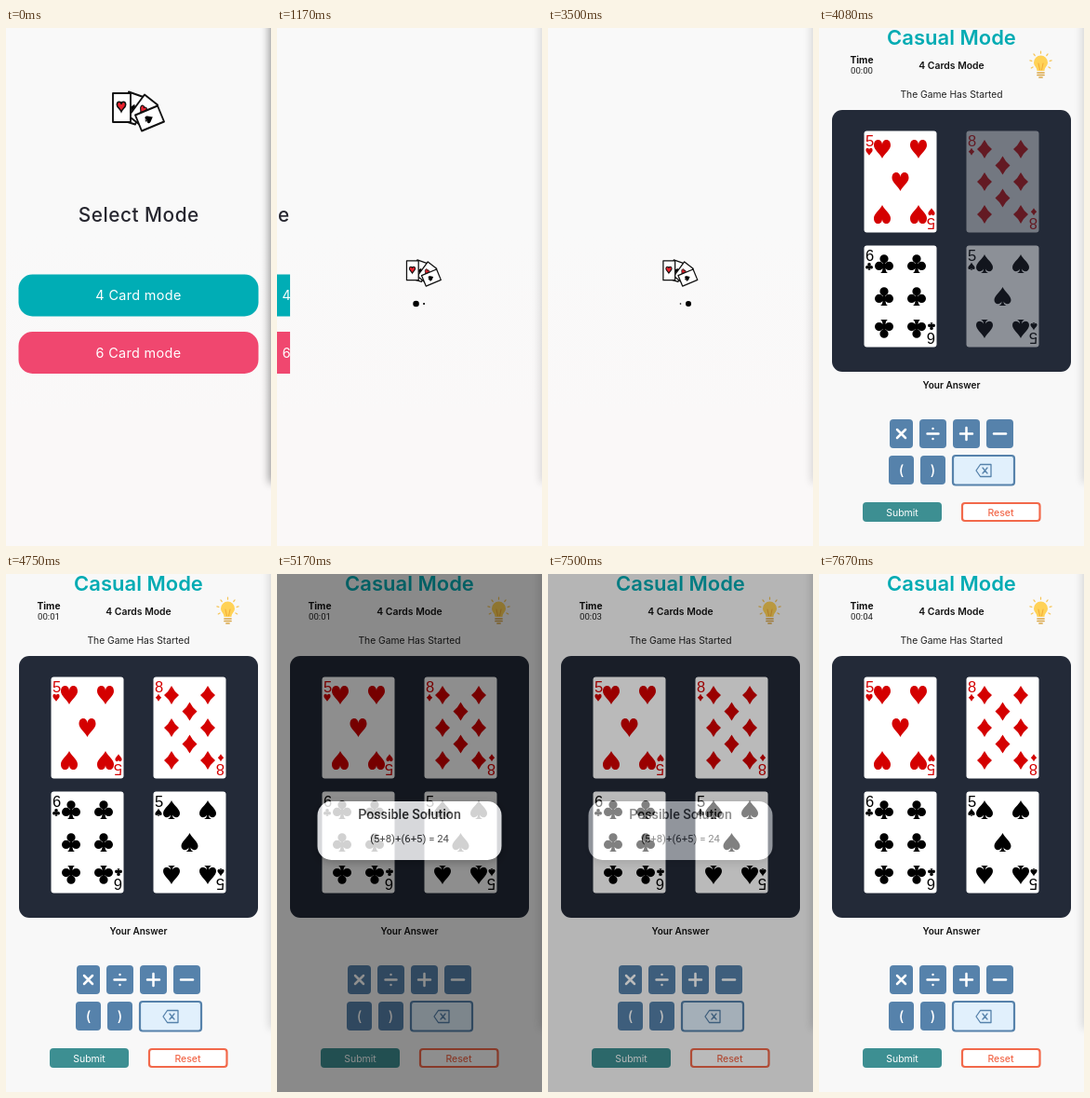
Recreate the animation shown at these times as an HTML page. Size 285 by 556 pixels, loop 8 s.

```html
<!DOCTYPE html>
<html lang="en">
<head>
<meta charset="utf-8">
<title>Card game</title>
<style>
  html, body { margin: 0; width: 100%; height: 100%; overflow: hidden; background: #f9f8f8; }
  svg { display: block; width: 285px; height: 556px; }
  text { font-family: Inter, "Open Sans", sans-serif; text-anchor: middle; }
  .roboto { font-family: Roboto, "Liberation Sans", sans-serif; }
  .rank { font-family: "Liberation Sans", Arial, sans-serif; }
  .wide { letter-spacing: .025em; }
</style>
</head>
<body>
<svg id="stage" viewBox="0 0 285 556"></svg>
<script>
const BLUE = '#5682ab', TEAL = '#00abb3', RED = '#d40000';

const PIPS = {
  heart: 'M0 10C-2 5-9 1-9-4C-9-8-7-10-4.5-10C-2-10 0-8 0-5C0-8 2-10 4.5-10C7-10 9-8 9-4C9 1 2 5 0 10Z',
  diamond: 'M0-10Q3-4 8 0Q3 4 0 10Q-3 4-8 0Q-3-4 0-10Z',
  spade: 'M0-10C2-5 9-1 9 4C9 9 3 9.5 1 5.5Q1 9 4 10H-4Q-1 9-1 5.5C-3 9.5-9 9-9 4C-9-1-2-5 0-10Z',
  club: [[0, -5.2], [-5.4, 2.4], [5.4, 2.4]].map(([x, y]) =>
    `M${x - 4.6} ${y}a4.6 4.6 0 1 1 9.2 0a4.6 4.6 0 1 1-9.2 0Z`).join('') +
    'M-1.5-2H1.5V4Q1.5 9 4 10H-4Q-1.5 9-1.5 4Z'
};

const rect = (x, y, w, h, r, fill, more = '') =>
  `<rect x="${x}" y="${y}" width="${w}" height="${h}" rx="${r}" fill="${fill}" ${more}/>`;
const text = (s, x, y, size, weight, fill, more = '') =>
  `<text x="${x}" y="${y}" font-size="${size}" font-weight="${weight}" fill="${fill}" ${more}>${s}</text>`;
const line = (d, stroke, width, fill = 'none') =>
  `<path d="${d}" fill="${fill}" stroke="${stroke}" stroke-width="${width}" stroke-linejoin="round" stroke-linecap="round"/>`;
const pip = (suit, x, y, scale = 1, turn = 0, more = '') =>
  `<path d="${PIPS[suit]}" transform="translate(${x} ${y}) rotate(${turn}) scale(${scale})" ${more}/>`;

// Fan of four cards, centred on the origin
function fan(x, y, scale) {
  const sheet = d => line(d, '#111', 1.9, '#fff');
  const inked = 'fill="#e8222e" stroke="#111" stroke-width="3"';
  return `<g transform="translate(${x} ${y}) scale(${scale})">` +
    sheet('M-10-21L7-15L-3 14L-19 9Z') + pip('spade', -5, -4, .4, 18) +
    sheet('M7-18L21-7L4 16L-10 5Z') + pip('heart', 5, -2, .38, 35, inked) +
    sheet('M21-6L28 11L4 21L-3 4Z') + pip('spade', 12, 8, .45, 62) +
    sheet('M-27-19.5H-8V11.5H-27Z') + pip('heart', -18, -5, .52, 0, inked) + '</g>';
}

// The corners and half of the pips repeat under a half turn
function card(id, x, y, rank, suit, half, fixed) {
  const color = suit == 'heart' || suit == 'diamond' ? RED : '#000';
  const side = text(rank, 6, 16, 16.5, 400, color, 'class="rank"') +
    pip(suit, 5.5, 22.3, .4) + half.map(p => pip(suit, ...p)).join('');
  return `<g id="${id}" transform="translate(${x} ${y})" fill="${color}">` +
    rect(0, 0, 78, 109, 3, '#fff') + side +
    `<g transform="rotate(180 39 54.5)">${side}</g>` +
    fixed.map(p => pip(suit, ...p)).join('') + '</g>';
}

function bulb(x, y) {
  let rays = '';
  for (let i = 0; i < 7; i++) {
    const a = (150 + i * 40) * Math.PI / 180, c = Math.cos(a), s = Math.sin(a);
    rays += `M${c * 9.8} ${s * 9.8}L${c * 11.8} ${s * 11.8}`;
  }
  return `<g transform="translate(${x} ${y})">` + line(rays, '#f6c455', 1.2) +
    '<path d="M-7.5 0A7.5 7.5 0 0 1 7.5 0C7.5 4 4 5 4 9H-4C-4 5-7.5 4-7.5 0Z" fill="#ffd257"/>' +
    line('M-2.5 1L-1 8M2.5 1L1 8', '#f3ab35', 1) +
    line('M-3.5 11H3.5M-3.5 13.5H3.5M-1.5 16H1.5', '#d9a648', 1.7) + '</g>';
}

const pair = (left, right, y) => [[left, y], [right, y]];
const top2 = pair(19.5, 58.5, 19.5), mid1 = [[39, 54.5]];

const key = (x, y, w, d) => rect(x, y, w, 31, 4, BLUE) + line(d, '#fff', 2.5);

const menu = rect(0, 0, 400, 556, 0, 'url(#paper)') + fan(142, 89.5, 1) +
  text('Select Mode', 142.8, 208, 20.8, 500, '#26262f', 'class="wide"') +
  rect(13.5, 264.5, 258, 45, 15, '#00adb5') +
  text('4 Card mode', 142.5, 292, 14.4, 400, '#fff', 'class="wide"') +
  rect(13.5, 326, 258, 45, 15, '#f0476f') +
  text('6 Card mode', 142.5, 353.7, 14.4, 400, '#fff', 'class="wide"');

const loader = rect(-1.5, 0, 290, 556, 0, 'url(#paper)') + fan(142, 263, .67) +
  [134, 142.5, 151].map(x => `<circle class="dot" cx="${x}" cy="296"/>`).join('');

const game = rect(0, 0, 285, 556, 0, '#f8f8f8') +
  text('Casual Mode', 142.5, 17.5, 22, 600, TEAL) +
  text('Time', 46, 38, 10.2, 700, '#111') +
  text('00:00', 46, 49.2, 9.6, 400, '#222', 'id="clock" class="roboto"') +
  text('4 Cards Mode', 142.5, 44, 10.4, 600, '#111') +
  bulb(238.5, 37) +
  text('The Game Has Started', 142.5, 75, 10.3, 400, '#222') +
  rect(14, 88, 257, 281, 11, '#232a38') +
  card('c1', 48.5, 110.5, 5, 'heart', top2, mid1) +
  card('c2', 158.5, 110.5, 8, 'diamond', [...top2, [39, 37]], pair(19.5, 58.5, 54.5)) +
  card('c3', 48.5, 233.5, 6, 'club', pair(21.5, 56.5, 19.5), pair(21.5, 56.5, 54.5)) +
  card('c4', 158.5, 233.5, 5, 'spade', top2, mid1) +
  text('Your Answer', 142.5, 387, 10, 600, '#111') +
  key(76, 420, 25, 'M84 431l9 9m0-9l-9 9') +
  key(108, 420, 29, 'M116.5 435.5h12M122.5 430v.1M122.5 441v.1') +
  key(144, 420, 29, 'M152 435.5h13m-6.5-6.5v13') +
  key(180, 420, 29, 'M188 435.5h13') +
  rect(75, 459, 27, 31, 4, BLUE) + text('(', 88.5, 479.5, 15, 500, '#fff') +
  rect(109, 459, 27, 31, 4, BLUE) + text(')', 122.5, 479.5, 15, 500, '#fff') +
  rect(144, 459, 66, 31.5, 3, '#e1f0fc', `stroke="${BLUE}" stroke-width="2.2"`) +
  line('M169 475l4.5-6.5h11.5v13h-11.5zM176 472l5 6m0-6l-5 6', BLUE, 1.3) +
  rect(47, 509, 85, 21, 4, '#3d8f92') + text('Submit', 89.5, 523.5, 10.5, 400, '#fff') +
  rect(154, 510, 83.5, 19, 3, '#fff', 'stroke="#f2694b" stroke-width="2.2"') +
  text('Reset', 195.5, 523.5, 10.5, 500, '#f2694b');

const dialog = rect(0, 0, 285, 556, 0, '#000', 'opacity=".54"') +
  rect(43.5, 247, 198, 63, 15, '#000', 'opacity=".35" filter="url(#soft)"') +
  rect(43.5, 244, 198, 63, 15, '#fff') +
  text('Possible Solution', 142.5, 263, 14.2, 500, '#222', 'class="roboto"') +
  text('(5+8)+(6+5) = 24', 142.5, 288, 11.3, 400, '#222', 'class="roboto"');

const $ = id => document.getElementById(id);
$('stage').innerHTML = `<defs>
    <filter id="soft" x="-50%" y="-50%" width="200%" height="200%">
      <feGaussianBlur stdDeviation="5"/></filter>
    <linearGradient id="paper" x2="0" y2="1">
      <stop offset=".4" stop-color="#f9f9f9"/><stop offset=".75" stop-color="#faf8f8"/>
    </linearGradient></defs>` +
  `<g id="menu">${menu}</g><g id="loader">${loader}</g>` +
  `<g id="game">${game}</g><g id="dialog">${dialog}</g>` +
  rect(283, -40, 40, 528, 0, '#000', 'id="edge" filter="url(#soft)"');

const dots = document.querySelectorAll('.dot');
const clamp = v => Math.min(1, Math.max(0, v));
const easeOut = (u, power) => 1 - (1 - clamp(u)) ** power;
const show = (id, on) => $(id).setAttribute('display', on ? 'inline' : 'none');
const fade = (id, v) => $(id).setAttribute('opacity', v);
const slide = (id, x) => $(id).setAttribute('transform', `translate(${x} 0)`);

function draw(t) {
  const push = easeOut((t - 945) / 400, 3.6);
  const inGame = t >= 3580;
  show('menu', push < 1);
  show('loader', push > 0 && !inGame);
  show('game', inGame);
  slide('menu', -96 * push);
  slide('loader', 285 * (1 - push));
  fade('edge', t < 830 ? .4 : .14);

  // Three dots pulse one after another
  const phase = (t - 1167) / 1400 + .13;
  dots.forEach((dot, i) =>
    dot.setAttribute('r', 3.8 * (Math.sin((phase - i * .2) * 2 * Math.PI) + 1) / 2));

  $('clock').textContent = '00:0' + Math.max(0, Math.floor((t - 3580) / 1000));
  fade('c2', clamp((t - 3700) / 1050));
  fade('c4', clamp((t - 3700) / 800));

  const open = easeOut((t - 5040) / 290, 3) * (1 - clamp((t - 7350) / 300));
  show('dialog', open > 0);
  fade('dialog', open);
}

// The picture steps 12 times a second
function tick() {
  const step = Math.floor(performance.now() % 8000 * .012 + .05);
  draw(step / .012);
  requestAnimationFrame(tick);
}
tick();
</script>
</body>
</html>
```
